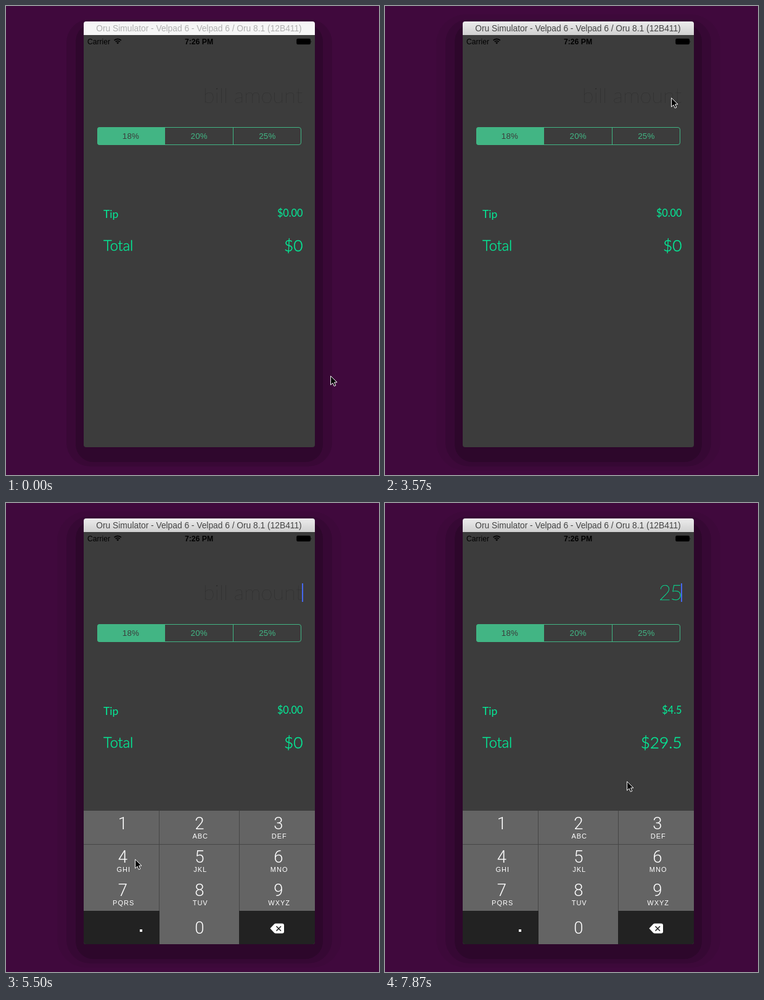
Recreate the animation shown at these times as an HTML page. Size 605 by 759 pixels, loop 8 s.

```html
<!DOCTYPE html>
<html lang="en">
<head>
<meta charset="utf-8">
<title>Tip calculator</title>
<style>
html, body { margin: 0; width: 100%; height: 100%; overflow: hidden; background: #40093d; }
svg { display: block; width: 605px; height: 759px; }
text { font-family: "Liberation Sans", Arial, sans-serif; white-space: pre; }
.lato { font-family: Lato, sans-serif; fill: #04ec98; }
.book { font-weight: 300; stroke: #04ec98; stroke-width: .4px; }
.mid { text-anchor: middle; }
.end { text-anchor: end; }
.seg { font-size: 13.3px; fill: #42b584; letter-spacing: .3px; }
.digit { font-family: Roboto, sans-serif; font-weight: 300; font-size: 27.5px; fill: #fff; }
.letters { font-size: 11px; fill: #fff; letter-spacing: 1px; }
#bill { font-size: 34.5px; font-weight: 100; fill: #292929; }
#bill.typed { fill: #08d890; stroke: #08d890; stroke-width: .5px; letter-spacing: -1.5px; }
</style>
</head>
<body>
<svg viewBox="0 0 605 759">
  <defs>
    <clipPath id="frame"><rect x="126" y="25" width="375" height="689" rx="4"/></clipPath>
    <linearGradient id="bar" x2="0" y2="1">
      <stop stop-color="#ececec"/><stop offset="1" stop-color="#d0d0d0"/>
    </linearGradient>
  </defs>
  <g id="idleShadow"/>
  <g id="liveShadow"/>

  <g clip-path="url(#frame)">
    <rect x="126" y="25" width="375" height="689" fill="#3c3c3c"/>
    <rect id="titleBar" x="126" y="25" width="375" height="22"/>
    <text id="title" class="mid" x="313" y="41" font-size="13.77">Oru Simulator - Velpad 6 - Velpad 6 / Oru 8.1 (12B411)</text>

    <text x="132" y="62" font-size="12.1">Carrier</text>
    <path d="M175.6 55.7a8 8 0 0 1 11.2 0M177.7 58a5 5 0 0 1 7 0" fill="none" stroke="#000" stroke-width="1.7"/>
    <path d="M179.2 59.4a2.9 2.9 0 0 1 4 0L181.2 61.6z"/>
    <text class="mid" x="313" y="62" font-size="12.2" font-weight="700">7:26 PM</text>
    <rect x="471.4" y="52.9" width="22.4" height="9.2" rx="2" stroke="#000" stroke-opacity=".4"/>
    <path d="M494.6 56q1.6 1.7 0 3.4z"/>

    <text id="bill" class="lato end" x="481" y="157"></text>
    <rect id="caret" x="480" y="130" width="2" height="30" fill="#4668ee"/>

    <g id="rates">
      <rect x="148.5" y="196.5" width="330" height="28" rx="3.5" fill="none" stroke="#42b584"/>
      <path d="M258 196H152a4 4 0 0 0-4 4V221a4 4 0 0 0 4 4H258z" fill="#42b584"/>
      <path d="M368.5 196V225" stroke="#42b584"/>
    </g>

    <text class="lato" x="158" y="343" font-size="17.5">Tip</text>
    <text id="tip" class="lato end" x="481.5" y="341" font-size="16.3"></text>
    <text class="lato book" x="158" y="396" font-size="23.5">Total</text>
    <text id="total" class="lato book end" x="481.5" y="396.5" font-size="26.2"></text>

    <g id="pad"><rect x="126" y="498" width="375" height="216" fill="#464646"/></g>
  </g>

  <path id="cursor" d="M.6 .8V15.2L4 12 6.3 17.2 8.8 16.1 6.6 11H11z" stroke="#fff" stroke-linejoin="round"/>
</svg>
<script>
const $ = id => document.getElementById(id);
const LOOP = 8000, STEP = 148.3, FIRST = 745;
const ACTIVATE = 3420, FOCUS = 4010, RATE = .18;

const taps = [
  { key: "2", down: 6090, up: 6240 },
  { key: "5", down: 6690, up: 6840 }
];
// the cursor's glides: start, end, and where it comes to rest
const home = [526, 598];
const glides = [
  [600, 1190, 574, 748], [1340, 2220, 410, 115], [2220, 2520, 451, 126],
  [2520, 2970, 461, 118], [3420, 3570, 464, 148], [4010, 4450, 331, 538],
  [4450, 5200, 199, 584], [5350, 5940, 268, 525], [6090, 6390, 287, 566],
  [7130, 7280, 294, 583], [7280, 7860, 392, 450]
];

const clamp = v => Math.min(1, Math.max(0, v));
const ease = v => v * v * (3 - 2 * v);

function add(parent, tag, attrs, text = "") {
  const el = document.createElementNS("http://www.w3.org/2000/svg", tag);
  for (const k in attrs) el.setAttribute(k, attrs[k]);
  el.textContent = text;
  return $(parent).appendChild(el);
}

// nested bands, each darker and closer to the window
function shadow(id, spread) {
  for (let grow = spread; grow > 0; grow -= 15) {
    const y = 35 - grow / 2;
    add(id, "rect", {
      x: 126 - grow, y, width: 375 + 2 * grow, height: 732 + grow * .47 - y,
      rx: 20 + grow * .65, opacity: .22 - grow * .004
    });
  }
}
shadow("idleShadow", 28);
shadow("liveShadow", 43);

["18%", "20%", "25%"].forEach((rate, i) =>
  add("rates", "text", {
    class: "seg mid", x: 202.5 + 110.7 * i, y: 215, style: i ? "" : "fill:#3c3c3c"
  }, rate));

const keys = {};
const letters = ",ABC,DEF,GHI,JKL,MNO,PQRS,TUV,WXYZ".split(",");
const edges = [126, 249, 379, 502];
const mids = [189.5, 314, 442];
[..."123456789.0<"].forEach((name, i) => {
  const col = i % 3, y = 498 + 54 * Math.floor(i / 3);
  const dark = ".<".includes(name);
  const gap = dark ? 0 : 1;
  keys[name] = add("pad", "rect", {
    x: edges[col] - (name === "<" ? 1 : 0), y: y + (i > 2 ? gap : 0),
    width: edges[col + 1] - edges[col] - (name === "0" ? 1 : gap),
    height: 54, fill: dark ? "#222" : "#646464"
  });
  if (dark) return;
  add("pad", "text", { class: "digit mid", x: mids[col], y: y + (name === "0" ? 37 : 30) }, name);
  if (letters[i]) add("pad", "text", { class: "letters mid", x: mids[col] + 1.2, y: y + 45 }, letters[i]);
});
add("pad", "rect", { x: 217, y: 690, width: 4, height: 4, fill: "#fff" });
add("pad", "path", { d: "M428.5 688.5L435 681.5Q436 680.5 437.5 680.5H448Q451 680.5 451 683.5V693.5Q451 696.5 448 696.5H437.5Q436 696.5 435 695.5z", fill: "#fff" });
add("pad", "path", { d: "M438.5 685L446 692.5M446 685L438.5 692.5", stroke: "#222", "stroke-width": 1.6 });

function cursorAt(t) {
  return glides.reduce(([x, y], [from, to, tx, ty]) => {
    const p = ease(clamp((t - from) / (to - from)));
    return [x + (tx - x) * p, y + (ty - y) * p];
  }, home).map(Math.round);
}

function draw(t) {
  // motion advances at the recording's frame rate
  const q = FIRST + STEP * Math.floor((t - FIRST) / STEP);

  const active = t >= ACTIVATE;
  $("idleShadow").style.display = active ? "none" : "";
  $("liveShadow").style.display = active ? "" : "none";
  $("titleBar").setAttribute("fill", active ? "url(#bar)" : "#f6f6f6");
  $("title").setAttribute("fill", active ? "#444" : "#b0b0b0");

  const typed = taps.filter(tap => t >= tap.up);
  const bill = typed.map(tap => tap.key).join("");
  const tip = bill * RATE;
  $("bill").textContent = bill || "bill amount";
  $("bill").classList.toggle("typed", bill !== "");
  $("tip").textContent = "$" + (tip ? +tip.toFixed(2) : "0.00");
  $("total").textContent = "$" + +(+bill + tip).toFixed(2);

  // the caret restarts its blink with each digit
  const since = t - (typed.length ? typed.at(-1).up : FOCUS);
  const phase = since % 1040;
  $("caret").style.display = since >= 0 && (phase < 600 || phase >= 890) ? "" : "none";

  const hidden = Math.round(216 * (1 - clamp((q - 3860) / 296)));
  $("pad").setAttribute("transform", `translate(0 ${hidden})`);
  for (const { key, down, up } of taps)
    keys[key].setAttribute("fill", t >= down && t < up ? "#222" : "#646464");

  $("cursor").setAttribute("transform", `translate(${cursorAt(q)})`);
}

const start = performance.now();
function tick() {
  draw((performance.now() - start) % LOOP);
  requestAnimationFrame(tick);
}
tick();
</script>
</body>
</html>
```
